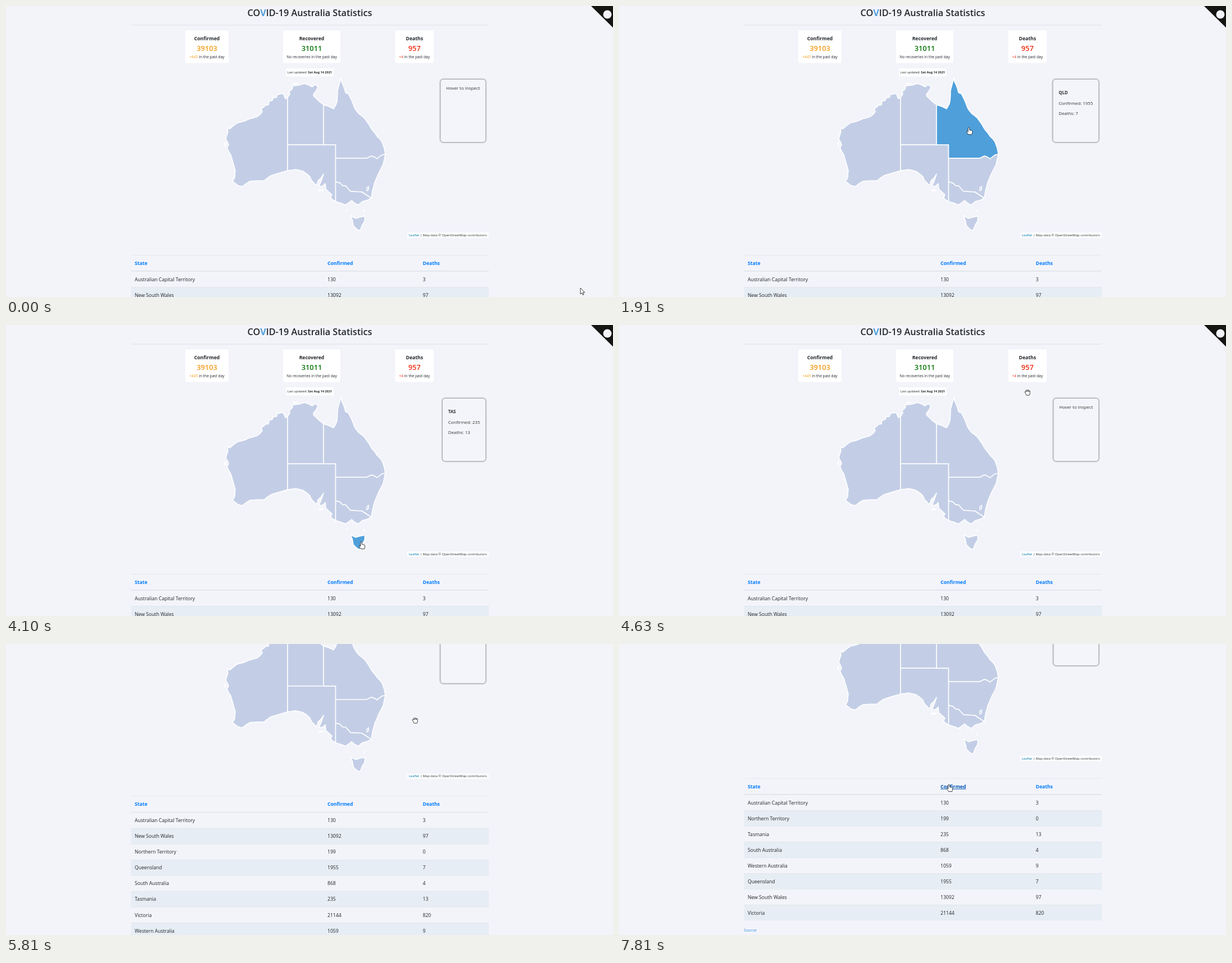
An HTML page that plays this animation: 1080x518 px, repeating every 8 s.

```html
<!DOCTYPE html>
<html lang="en">
<head>
<meta charset="utf-8">
<title>COVID-19 Australia Statistics</title>
<style>
html, body { margin: 0; width: 100%; height: 100%; overflow: hidden; background: #f3f4fa; }
svg { display: block; width: 1080px; height: 518px; font: 8.65px "Open Sans", "Noto Sans", sans-serif; fill: #212529; }
.mid { text-anchor: middle; }
.title { font-size: 16.2px; font-weight: 600; }
.bold, .head { font-weight: 700; }
.head { fill: #007bff; }
.head.hot { fill: #0056b3; text-decoration: underline; }
.num { font-size: 12.8px; font-weight: 600; }
.small { font-size: 6.65px; }
.tiny { font-size: 5.55px; }
.credit { font-size: 5.95px; fill: #333; }
.white { fill: #fff; }
.line { fill: #dee2e6; }
#map path { fill: #c3cee6; stroke: #fff; stroke-width: 1.5; stroke-linejoin: round; }
#map path.hot { fill: #4f9fda; }
#panel { font-size: 7.875px; fill: #333; }
#box { fill: #f4f5fa; stroke: #b0b0b4; filter: drop-shadow(0 .6px 1px #0007); }
#cursor path { fill: #fff; stroke: #111; stroke-width: .8; stroke-linejoin: round; }
</style>
</head>
<body>
<svg id="stage" viewBox="0 0 1080 518">
<g id="page">
  <text class="title mid" x="540.5" y="18.3">CO<tspan class="bold" fill="#4f9fe0">V</tspan>ID-19 Australia Statistics</text>
  <path d="M1041 0H1080V38.5Z" fill="#151513"/>
  <circle cx="1070" cy="15" r="7.5" fill="#f3f4fa"/>
  <rect class="line" x="222.5" y="33.5" width="636.5" height="1"/>
  <g id="cards"></g>
  <rect class="white" x="498" y="111" width="85" height="14.5" rx="1.5"/>
  <text class="tiny mid" x="540.3" y="120.2">Last updated: <tspan class="bold">Sat Aug 14 2021</tspan></text>
  <g id="map"></g>
  <g id="isles" class="white">
    <ellipse cx="515" cy="138" rx="4.5" ry="1.6"/>
    <ellipse cx="390" cy="246" rx="1.6" ry="4"/>
    <ellipse cx="560" cy="328" rx="5" ry="1.8"/>
    <ellipse cx="607" cy="364" rx="1" ry="2"/>
    <ellipse cx="637" cy="365" rx="1.2" ry="2.4"/>
  </g>
  <g id="panel"><rect id="box" y="130.5" height="112" rx="5"/><g id="info"></g></g>
  <rect class="white" x="714" y="403" width="145" height="9.5" opacity=".8"/>
  <text class="credit" x="716.5" y="409.7"><tspan fill="#0078a8">Leaflet</tspan> | Map data © OpenStreetMap contributors</text>
  <rect class="line" x="222.5" y="443" width="636.5" height=".7"/>
  <text class="head" x="229" y="460.8">State</text>
  <text class="head" id="sorter" x="572" y="460.8">Confirmed</text>
  <text class="head" x="741.5" y="460.8">Deaths</text>
  <g id="rows"></g>
  <rect class="line" x="222.5" y="471" width="636.5" height="1"/>
  <text x="222.3" y="715.6" font-size="7" fill="#3490dc">Source</text>
</g>
<g id="cursor"></g>
</svg>

<script>
const $ = id => document.getElementById(id);
const LOOP = 8000, SORT_AT = 7350, ROW_TOP = 472, ROW_H = 28.06;

const states = [
  ["ACT", "Australian Capital Territory", 130, 3],
  ["NSW", "New South Wales", 13092, 97],
  ["NT", "Northern Territory", 199, 0],
  ["QLD", "Queensland", 1955, 7],
  ["SA", "South Australia", 868, 4],
  ["TAS", "Tasmania", 235, 13],
  ["VIC", "Victoria", 21144, 820],
  ["WA", "Western Australia", 1059, 9]
];
const sorted = [...states].sort((a, b) => a[2] - b[2]);

let seed = 7;
const jitter = () => (seed = seed * 16807 % 2147483647) / 1073741823 - 1;
const points = str => str.split(",").map(p => p.split(" ").map(Number));

// A shore adds a slightly displaced midpoint to every stretch
const shore = str => points(str).flatMap((a, i, all) => {
  const b = all[i + 1];
  return b ? [a, a.map((v, j) => (v + b[j]) / 2 + jitter())] : [a];
});

const west = shore("501 163,497 165,494 157,489 156,482 158,481 163,475 163,474 168,468 169,467 176,461 177,455 182,456 188,447 197,433 201,412 208,398 219,395 217,395 224,391 237,396 247,393 251,400 265,408 293,407 305,403 312,412 319,421 321,434 312,459 311,471 302,501 293");
const north = shore("501 163,505 157,503 153,510 146,509 142,521 141,531 138,545 144,550 140,555 144,547 157,549 162,565 176");
const east = shore("565 176,583 183,589 170,590 150,596 128,599 139,604 154,609 156,620 181,628 192,638 200,651 220,661 233,669 242,675 264");
const southeast = shore("675 264,671 282,656 314,650 342");
const south = shore("650 342,634 348,627 354,615 346,604 354,586.5 348");
const bight = shore("586.5 348,578 342,580 336,569 326,568 316,564 320,557 321,565 299,555 311,551 319,545 312,541 304,528 294,515 291,501 293");
const dumaresq = points("675 264,669 265,660 272,656 269,650 267,642 271,586.5 271");
const murray = points("650 342,633 331,613 330,604 320,599 320,594 315,586.5 313");

const outlines = {
  WA: west,
  NT: [...north, ...points("565 247,501 247")],
  SA: [...points("501 247,586.5 247"), ...bight],
  QLD: [...east, ...dumaresq, ...points("586.5 247,565 247")],
  NSW: [...southeast, ...murray, ...dumaresq.toReversed()],
  VIC: [...murray, ...south.toReversed()],
  TAS: shore("613 373,622 378,638 374,638 383,631 397,627 399,618 391,613 373"),
  ACT: points("645 321,642 324,642 329,645 327")
};

// Moves: start, end, then the values reached
const moves = [
  [0, 0, 1022, 502], [20, 270, 640, 432], [480, 1290, 440, 225], [1310, 1980, 628, 216],
  [2130, 2900, 560, 280], [2910, 3010, 610, 343], [3080, 3500, 628, 297], [3620, 4050, 632, 386],
  [4190, 4430, 632, 220], [4430, 4630, 727, 120], [4780, 5000, 728, 136],
  [5880, 6120, 560, 250], [6120, 6420, 396, 312], [6450, 7130, 587, 250]
];
const scrolls = [[0, 0, 0], [5340, 5530, 57.3], [5600, 5900, 204]];

const ease = p => p <= 0 ? 0 : p >= 1 ? 1 : p * p * (3 - 2 * p);
const at = (list, t) => list.reduce((from, [a, b, ...to]) =>
  t < a ? from : from.map((v, i) => v + (to[i] - v) * ease((t - a) / (b - a || 1))), list[0].slice(2));

const shapes = {
  arrow: "M0 0V11L2.6 8.6 4.3 12.4 6 11.6 4.3 8H7.8Z",
  pointer: "M-1.2 1.2A1.2 1.2 0 0 1 1.2 1.2V4.4L5.5 5.2Q6.5 5.6 6.5 7V9.5L5.5 12.6H-.5L-3.8 8.2Q-4 6.7-2.8 6.8L-1.2 8Z",
  grab: "M-4.5 .3Q-5.5-1.5-4-1.7L-3-.8V-3.5Q-2.2-4.8-1.3-3.7Q-.4-5.5 .7-3.9Q2-4.7 2.5-3.2Q4.2-3.5 4.2-1.9V2L3 5H-2ZM-1.2-3.6V-1M.7-3.8V-1M2.5-3V-1"
};

const text = (x, y, str, cls = "") => `<text x="${x}" y="${y}" class="${cls}">${str}</text>`;

// Rebuild markup only when it differs
function fill(id, html) {
  const el = $(id);
  if (el.last !== html) el.innerHTML = el.last = html;
}

function card(x, w, label, num, color, change, rest) {
  const c = x + w / 2;
  return `<rect class="white" x="${x}" y="43.5" width="${w}" height="58" rx="3"/>` +
    text(c, 61, label, "bold mid") +
    `<g fill="${color}">${text(c, 80, num, "num mid")}</g>` +
    text(c, 93, `<tspan fill="${color}">${change}</tspan>${rest} in the past day`, "small mid");
}

function row([, name, confirmed, deaths], i, hot) {
  const y = ROW_TOP + i * ROW_H, base = y + 17.5;
  const color = hot ? "#b8d0ff" : i % 2 ? "#e6edf4" : "none";
  return `<rect x="222.5" y="${y}" width="636.5" height="${ROW_H}" fill="${color}"/>` +
    `<rect class="line" x="222.5" y="${y}" width="636.5" height=".55"/>` +
    text(229, base, name) + text(572, base, confirmed) + text(741.5, base, deaths);
}

function showPanel(state) {
  fill("info", state
    ? text(0, 157.2, state[0], "bold") + text(0, 175.5, "Confirmed: " + state[2]) + text(0, 194, "Deaths: " + state[3])
    : text(0, 149, "Hover to Inspect"));
  const w = Math.max(...[...$("info").children].map(e => e.getComputedTextLength()));
  $("info").setAttribute("transform", `translate(${843.2 - w})`);
  $("box").setAttribute("x", 833 - w);
  $("box").setAttribute("width", w + 20.5);
}

function draw(now) {
  const t = now % LOOP;
  const [scroll] = at(scrolls, t), [x, y] = at(moves, t);
  const point = $("stage").createSVGPoint();
  point.x = x;
  point.y = y + scroll;
  const inside = (l, r, top, bottom) => x > l && x < r && point.y > top && point.y < bottom;

  const hover = states.find(s => $(s[0]).isPointInFill(point));
  for (const s of states) $(s[0]).classList.toggle("hot", s === hover);
  showPanel(hover);

  const overRow = inside(222, 859, ROW_TOP, 697) ? Math.floor((point.y - ROW_TOP) / ROW_H) : -1;
  const list = t < SORT_AT ? states : sorted;
  fill("rows", list.map((s, i) => row(s, i, i === overRow)).join(""));

  const overHead = inside(572, 618, 451, 467);
  $("sorter").classList.toggle("hot", overHead);

  const kind = hover || overHead ? "pointer" : inside(222, 859, 108, 412) ? "grab" : "arrow";
  fill("cursor", `<path d="${shapes[kind]}"/>`);
  $("cursor").setAttribute("transform", `translate(${x} ${y})`);
  $("page").setAttribute("transform", `translate(0 ${-scroll})`);
}

fill("cards",
  card(319, 77, "Confirmed", 39103, "#f59c1a", "+445", "") +
  card(493, 102, "Recovered", 31011, "#087508", "", "No recoveries") +
  card(692.5, 68.5, "Deaths", 957, "#ee2c10", "+4", ""));
fill("map", Object.entries(outlines).map(([id, pts]) => `<path id="${id}" d="M${pts.join(" ")}Z"/>`).join(""));

let start;
function tick(now) {
  start ??= now;
  draw(now - start);
  requestAnimationFrame(tick);
}
draw(0);
requestAnimationFrame(tick);
</script>
</body>
</html>
```
